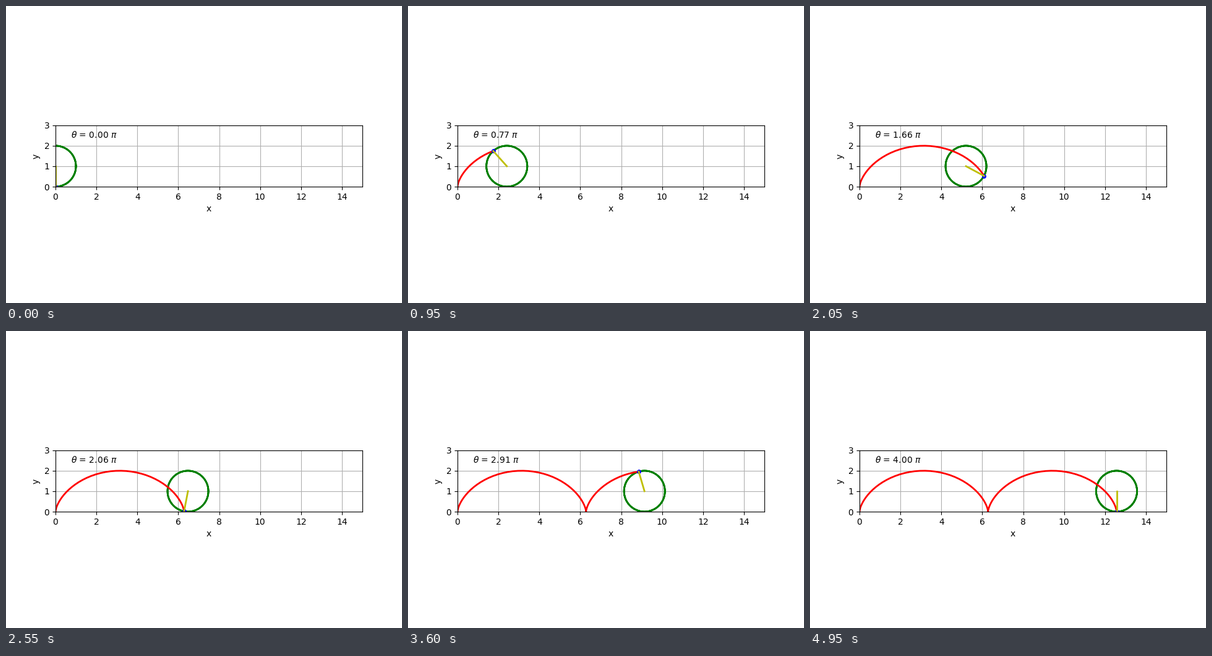
A matplotlib script that plays this animation: 640 by 480 pixels, repeating every 5000 ms.

```python
import numpy as np
import matplotlib.pyplot as plt
from matplotlib.animation import FuncAnimation

FRAMES = 100
INTERVAL = 50

theta = np.linspace(0, 4 * np.pi, FRAMES)
path_x = theta - np.sin(theta)
path_y = 1 - np.cos(theta)

fig, ax = plt.subplots(figsize=(6.4, 4.8), dpi=100)
ax.set_aspect("equal")
ax.set_xlim(0, 15)
ax.set_ylim(0, 3)
ax.set_xlabel("x")
ax.set_ylabel("y")
ax.grid()

wheel, = ax.plot([], [], "g", lw=2)
trail, = ax.plot([], [], "r", lw=2)
dot, = ax.plot([], [], "bo", ms=4)
spoke, = ax.plot([], [], "y", lw=2)
label = ax.text(0.05, 0.8, "", transform=ax.transAxes)


def update(i):
    center, x, y = theta[i], path_x[i], path_y[i]
    wheel.set_data(center + np.cos(theta), 1 + np.sin(theta))
    trail.set_data(path_x[:i + 1], path_y[:i + 1])
    dot.set_data([x], [y])
    spoke.set_data([center, x], [1, y])
    label.set_text(rf"$\theta$ = {center / np.pi:.2f} $\pi$")
    return wheel, trail, dot, spoke, label


anim = FuncAnimation(fig, update, frames=FRAMES, interval=INTERVAL,
                     init_func=lambda: update(0), repeat=True, repeat_delay=0)
plt.show()
```
